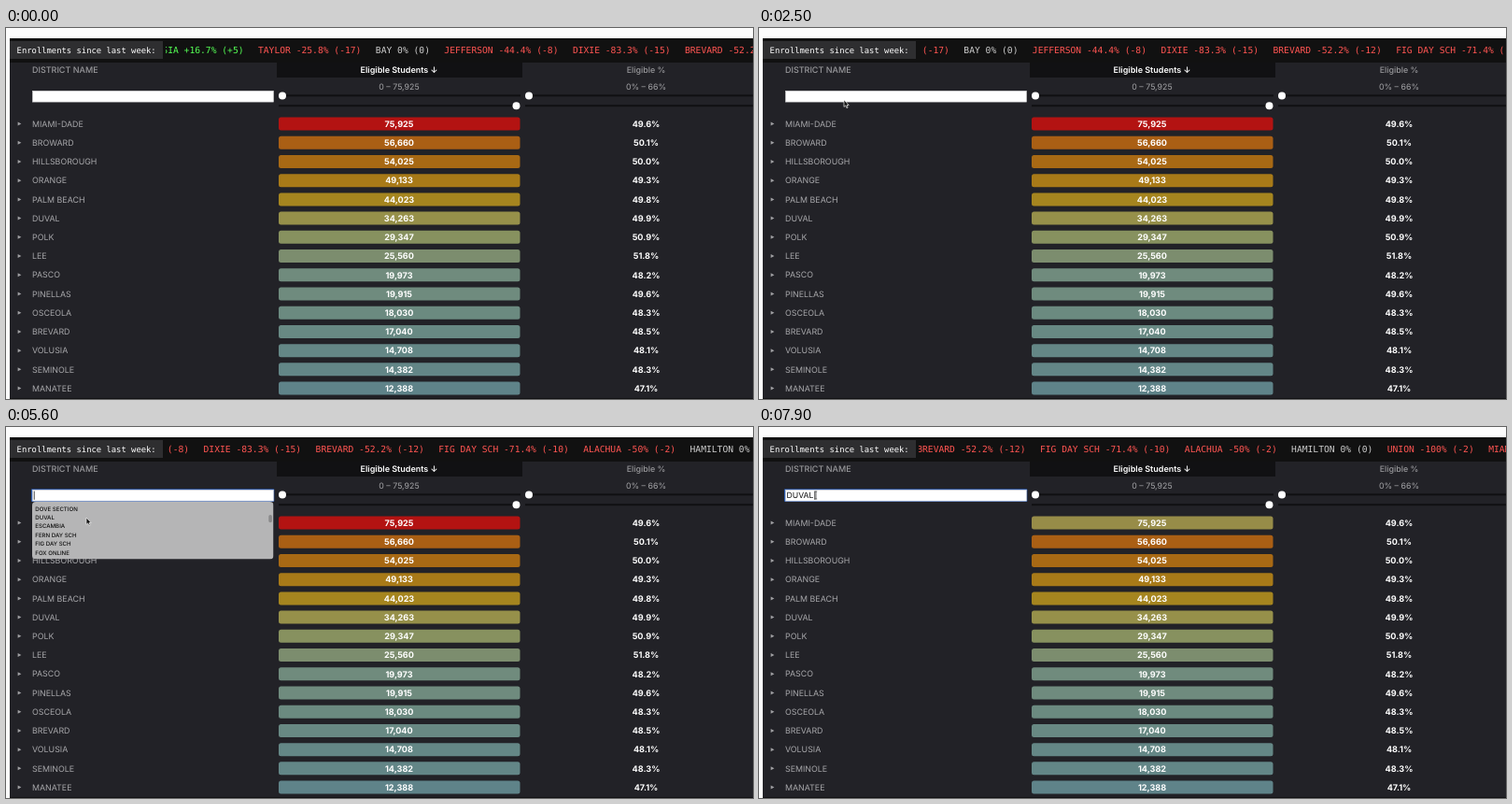
Recreate the animation shown at these times as an HTML page. Size 800 by 397 pixels, loop 8 s.

```html
<!DOCTYPE html>
<html lang="en">
<head>
<meta charset="utf-8">
<title>District enrollments</title>
<style>
  html, body { margin: 0; width: 100%; height: 100%; overflow: hidden; background: #fcfcfc; }
  svg { display: block; width: 800px; height: 397px; }
  text { font-family: Inter, Roboto, sans-serif; text-rendering: geometricPrecision; white-space: pre; }
  .mono { font-family: "DejaVu Sans Mono", "Liberation Mono", monospace; }
  .mid { text-anchor: middle; }
</style>
</head>
<body>
<svg id="stage" viewBox="0 0 800 397"></svg>
<script>
const LOOP = 8000, STEP = 100;
const FOCUS = 2700, OPEN = 2900, PICK = 6000, FILTER = 6100, RESTORE = 7850, FADE = 1000;
const WIDE = 1.0073;            // table width once the scrollbar is gone
const ROW_Y = 102.5, PITCH = 20.22;
const ITEM_PITCH = 9.37;

const ROWS = [
  ["MIAMI-DADE", "75,925", "49.6%", "#b31312"],
  ["BROWARD", "56,660", "50.1%", "#aa5f14"],
  ["HILLSBOROUGH", "54,025", "50.0%", "#a86914"],
  ["ORANGE", "49,133", "49.3%", "#a87a18"],
  ["PALM BEACH", "44,023", "49.8%", "#a5851f"],
  ["DUVAL", "34,263", "49.9%", "#96904a"],
  ["POLK", "29,347", "50.9%", "#87915f"],
  ["LEE", "25,560", "51.8%", "#7c8d6e"],
  ["PASCO", "19,973", "48.2%", "#708b7d"],
  ["PINELLAS", "19,915", "49.6%", "#6f8b7e"],
  ["OSCEOLA", "18,030", "48.3%", "#6b8a80"],
  ["BREVARD", "17,040", "48.5%", "#688983"],
  ["VOLUSIA", "14,708", "48.1%", "#648786"],
  ["SEMINOLE", "14,382", "48.3%", "#638687"],
  ["MANATEE", "12,388", "47.1%", "#5f8389"]
];
const NEWS = [
  "VOLUSIA +16.7% (+5)", "TAYLOR -25.8% (-17)", "BAY 0% (0)", "JEFFERSON -44.4% (-8)",
  "DIXIE -83.3% (-15)", "BREVARD -52.2% (-12)", "FIG DAY SCH -71.4% (-10)",
  "ALACHUA -50% (-2)", "HAMILTON 0% (0)", "UNION -100% (-2)", "MIAMI-DADE -4.8% (-9)"
];
const OPTIONS = [
  "ALACHUA", "BAKER", "BAY", "BRADFORD", "BREVARD", "BROWARD", "CALHOUN", "CHARLOTTE",
  "CITRUS", "CLAY", "COLLIER", "COLUMBIA", "DELL/CREST", "DESOTO", "DIXIE", "DOVE SECTION",
  "DUVAL", "ESCAMBIA", "FERN DAY SCH", "FIG DAY SCH", "FOX ONLINE", "FLAGLER", "FRANKLIN"
];

// Tracks: [time, value...]
const POINTER = [
  [400, 30, 412], [900, 55, 245], [1200, 66, 164], [1700, 86, 96], [2500, 91, 77],
  [2900, 90, 76], [3400, 87, 118], [4800, 87, 118], [5500, 86, 97], [6000, 86, 97],
  [6400, 87, 93], [7300, 87, 93], [7700, 61, 73]
];
const SCROLL = [[3000, 0], [3800, 71.3], [4400, 105], [5500, 140.2]];

const stage = document.getElementById("stage");

function el(tag, attrs, parent = stage) {
  const node = document.createElementNS("http://www.w3.org/2000/svg", tag);
  for (const key in attrs) node.setAttribute(key, attrs[key]);
  parent.append(node);
  return node;
}

function rect(x, y, w, h, fill, parent, extra) {
  return el("rect", { x, y, width: w, height: h, fill, ...extra }, parent);
}

// Centres capital letters on y.
function label(str, x, y, size, fill, parent, extra) {
  const node = el("text", { x, y: y + size * 0.362, "font-size": size, fill, ...extra }, parent);
  node.textContent = str;
  return node;
}

function track(points, t) {
  if (t <= points[0][0]) return points[0].slice(1);
  for (let i = 1; i < points.length; i++) {
    const a = points[i - 1], b = points[i];
    if (t <= b[0]) {
      const p = (t - a[0]) / (b[0] - a[0]);
      return a.slice(1).map((v, j) => v + (b[j + 1] - v) * p);
    }
  }
  return points[points.length - 1].slice(1);
}

// CSS "ease" solved by bisection.
function ease(p) {
  if (p <= 0) return 0;
  if (p >= 1) return 1;
  const curve = (s, a, b) => 3 * s * (1 - s) * (1 - s) * a + 3 * s * s * (1 - s) * b + s * s * s;
  let lo = 0, hi = 1;
  for (let i = 0; i < 20; i++) {
    const m = (lo + hi) / 2;
    if (curve(m, 0.25, 0.25) < p) lo = m; else hi = m;
  }
  return curve(lo, 0.1, 1);
}

function mix(a, b, p) {
  const part = (c, i) => parseInt(c.slice(i, i + 2), 16);
  return `rgb(${[1, 3, 5].map(i => Math.round(part(a, i) + (part(b, i) - part(a, i)) * p))})`;
}

function show(node, on) {
  node.style.display = on ? "" : "none";
}

function makeTable(k, rows) {
  const g = el("g", {});
  const X = v => 4 + (v - 4) * k;
  const full = rows.length > 1;
  rect(4, 37, 796, full ? 360 : 75, "#222227", g);
  rect(X(290), 37, X(553) - X(290), 16, "#111113", g);
  label("DISTRICT NAME", 28, 45, 9, "#98989b", g, { "font-weight": 500 });
  label("Eligible Students ↓", X(421), 45, 9, "#fff", g, { class: "mid", "font-weight": 600 });
  label("Eligible %", X(685.5), 45, 8.9, "#98989b", g, { class: "mid", "font-weight": 500 });
  label("0 – 75,925", X(421), 62.5, 8.8, "#a4a4a7", g, { class: "mid" });
  label("0% – 66%", X(685.5), 62.5, 8.8, "#a4a4a7", g, { class: "mid" });
  for (const x of [292, 556]) {
    rect(X(x), 71.3, X(x + 259) - X(x), 2, "#101012", g);
    rect(X(x), 82.2, X(x + 259) - X(x), 2, "#101012", g);
    el("circle", { cx: X(x + 4), cy: 72.5, r: 4, fill: "#fff" }, g);
    el("circle", { cx: X(x + 254.5), cy: 83.3, r: 4, fill: "#fff" }, g);
  }
  const bars = rows.map(([, , , color], i) =>
    rect(X(292), ROW_Y - 7 + i * PITCH, X(550.5) - X(292), 14, color, g, { rx: 2.5 }));
  const hover = rect(4, 0, 796, 19.6, "#fff", g, { opacity: 0.115 });
  rows.forEach(([name, count, share], i) => {
    const y = ROW_Y + i * PITCH;
    el("path", { d: `M12.6 ${y - 2}l3.8 2l-3.8 2z`, fill: "#a0a0a3" }, g);
    label(name, 28, y, 8.85, "#a8a8ab", g);
    label(count, X(421), y, 9.1, "#fff", g, { class: "mid", "font-weight": 700 });
    label(share, X(685.5), y, 9.1, "#fff", g, { class: "mid", "font-weight": 700 });
  });
  rect(full ? 4 : 0, 396, 800, 1, full ? "#111113" : "#b4b4b4", g);
  return { g, bars, hover, count: rows.length };
}

const defs = el("defs", {});
rect(171, 11, 629, 26, "#000", el("clipPath", { id: "newsClip" }, defs));
rect(28, 80, 258.5, 61.5, "#000", el("clipPath", { id: "listClip" }, defs), { rx: 4 });

const fullTable = makeTable(1, ROWS);
const oneTable = makeTable(WIDE, [ROWS[5]]);

// Ticker
rect(4, 11, 796, 26, "#111", stage);
const news = el("g", {}, el("g", { "clip-path": "url(#newsClip)" }));
const CHAR = 5.82, GAP = 15.3;
let newsX = 144.1;
for (const item of NEWS) {
  const fill = item.includes("+") ? "#5f5" : item.includes("-") && !item.includes(" 0%") ? "#ff5552" : "#ccc";
  label(item, newsX, 23.3, CHAR / 0.602, fill, news, { class: "mono" });
  newsX += item.length * CHAR + GAP;
}
rect(4, 14, 164, 19, "#2e2e30", stage);
label("Enrollments since last week:", 11.6, 23.3, 8.85, "#fff", stage, { class: "mono" });

// Suggestion list
const list = el("g", { "clip-path": "url(#listClip)" });
rect(28, 80, 258.5, 61.5, "#b5b5b6", list);
const items = el("g", {}, list);
OPTIONS.forEach((name, i) =>
  label(name, 31.3, 87.1 + i * ITEM_PITCH, 6.1, "#111", items, { "font-weight": 500 }));
const thumb = rect(281.3, 0, 3.6, 8.2, "#8a8a8b", list, { rx: 1.8 });

// Search field
const ring = rect(27, 66.2, 260, 13.8, "#2f5fb5", stage, { rx: 1 });
const field = rect(28.5, 67.3, 258, 11.8, "#fff", stage, { stroke: "#d4d4d6", "stroke-width": 0.6 });
const typed = label("DUVAL", 29.6, 73.2, 8.6, "#111", stage);
const caret = rect(0, 68.6, 0.8, 9.2, "#222", stage);

// Pointers
const arrow = el("path", {
  d: "M0 0V7.4L1.7 5.9L2.9 8.6L4.1 8.1L3 5.5H5.2Z",
  fill: "#111", stroke: "#f4f4f4", "stroke-width": 0.7, "stroke-linejoin": "round"
});
const beam = el("path", { d: "M-1.2-4h2.4M0-4V4M-1.2 4h2.4", stroke: "#333", "stroke-width": 0.7, fill: "none" });

function setHover(table, y) {
  const i = Math.floor((y - ROW_Y + PITCH / 2) / PITCH);
  const on = i >= 0 && i < table.count;
  show(table.hover, on);
  if (on) table.hover.setAttribute("y", ROW_Y - 9.6 + i * PITCH);
}

function draw(t) {
  const filtered = t >= FILTER && t < RESTORE;
  const focused = t >= FOCUS;
  const open = t >= OPEN && t < PICK;
  const picked = t >= PICK;

  show(fullTable.g, !filtered);
  show(oneTable.g, filtered);
  news.setAttribute("transform", `translate(${-0.0706 * t} 0)`);

  const red = ROWS[0][3], olive = ROWS[5][3];
  oneTable.bars[0].setAttribute("fill", mix(red, olive, ease((t - FILTER) / FADE)));
  fullTable.bars[0].setAttribute("fill",
    t >= RESTORE ? mix(olive, red, ease((t - RESTORE) / FADE)) : red);

  show(list, open);
  const [scroll] = track(SCROLL, t);
  items.setAttribute("transform", `translate(0 ${-scroll})`);
  thumb.setAttribute("y", 86 + scroll * 0.057);

  const wide = filtered ? 2 : 0;
  show(ring, focused);
  ring.setAttribute("width", 260.3 + wide);
  field.setAttribute("width", 258 + wide);
  show(typed, picked);
  show(caret, focused);
  caret.setAttribute("x", picked ? 59.4 : 29.8);

  // The row highlight trails the pointer by one step.
  const [x, y] = track(POINTER, t);
  const [, lateY] = track(POINTER, t - STEP);
  setHover(fullTable, open || t >= PICK || t < POINTER[0][0] ? 0 : lateY);
  setHover(oneTable, y < 88 ? 0 : Math.max(y, 95));
  const text = t > 7300 && y < 80;
  show(arrow, !text);
  show(beam, text);
  (text ? beam : arrow).setAttribute("transform", `translate(${x} ${y})`);
}

const start = performance.now();
function tick() {
  const t = (performance.now() - start) % LOOP;
  draw(Math.floor(t / STEP) * STEP);
  requestAnimationFrame(tick);
}
tick();
</script>
</body>
</html>
```
